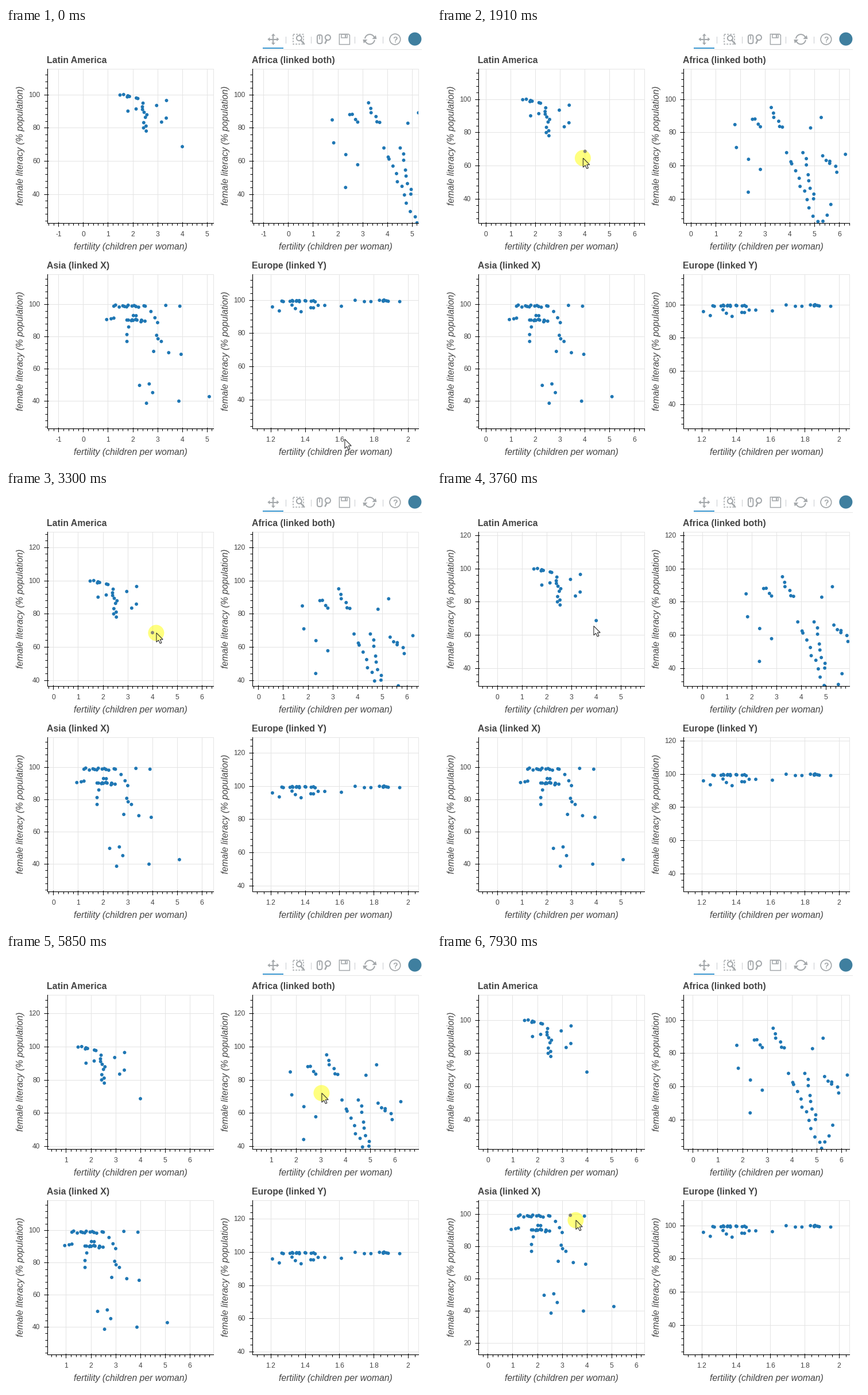
Animation, 740 px wide and 756 px high, one loop 8 s. Source, as a matplotlib script:

```python
import math

import matplotlib.pyplot as plt
import numpy as np
from matplotlib.animation import FuncAnimation
from matplotlib.collections import LineCollection
from matplotlib.patches import Circle, FancyBboxPatch, Polygon, Rectangle

WIDTH, HEIGHT, DPI = 740, 756, 100
PT = 72 / DPI  # points per pixel
LOOP_MS, INTERVAL = 8000, 40
STEPS_PER_MS = 13 / 1000  # the screen refreshes 13 times a second

BLUE, GRID, INK, ICON = "#1f77b4", "#e5e5e5", "#444444", "#a4a8ab"
COVERED = "#86867a"
PANEL_W, PANEL_H = 289, 268
HALO_RADIUS = 14

plt.rcParams["font.family"] = "Liberation Sans"
rng = np.random.default_rng(7)


def cloud(jitter, *strands):
    """Join strands of evenly spaced points whose inner points are jittered."""
    parts = []
    for count, start, end in strands:
        points = np.linspace(start, end, count)
        points[1:-1] += rng.uniform(-1, 1, points[1:-1].shape) * jitter
        parts.append(points)
    return np.vstack(parts)


# Strands run between (fertility, literacy) points.
LATIN = cloud(
    (0.1, 0.8),
    (7, (1.49, 99.7), (2.21, 97.6)), (2, (1.81, 90), (2.14, 91.3)),
    (10, (2.42, 94.8), (2.55, 78)), (2, (2.97, 93.4), (3.37, 96.4)),
    (2, (3.17, 83.4), (3.36, 85.8)), (1, (4.01, 68.6), (4.01, 68.6)))
AFRICA = cloud(
    (0.08, 2),
    (2, (1.78, 84.7), (1.84, 70.9)), (2, (2.33, 63.8), (2.32, 44)),
    (4, (2.49, 87.9), (2.81, 83.4)), (6, (3.25, 95), (3.70, 83.2)),
    (12, (3.87, 67.8), (5.21, 22.7)), (8, (4.53, 67.8), (4.96, 40)),
    (2, (4.84, 82.7), (5.27, 89)), (6, (5.33, 65.9), (5.90, 56)),
    (2, (2.81, 57.7), (6.25, 66.8)), (3, (5.66, 36.6), (5.34, 26.5)))
ASIA = cloud(
    (0.06, 0.8),
    (13, (1.24, 98.9), (2.51, 98.9)), (2, (3.34, 99.4), (3.91, 98.9)),
    (12, (1.77, 90.3), (2.50, 89.6)), (2, (2.03, 93.1), (2.14, 93)),
    (3, (0.95, 90.6), (1.24, 91.5)), (3, (2.74, 95.6), (3.01, 88.7)),
    (3, (1.84, 86), (1.77, 77)), (3, (2.97, 80.8), (3.16, 77)),
    (3, (2.85, 70.8), (3.96, 69)), (2, (2.28, 49.7), (2.67, 50.6)),
    (2, (2.81, 45.2), (2.56, 38.6)), (2, (3.87, 39.9), (5.10, 42.7)))
EUROPE = cloud(
    (0.02, 0.6),
    (14, (1.265, 99.3), (1.459, 98.9)), (2, (1.21, 95.8), (1.25, 93.4)),
    (3, (1.324, 96.9), (1.377, 92.9)), (4, (1.434, 95.3), (1.515, 96.7)),
    (2, (1.612, 96.2), (1.692, 99.8)), (2, (1.746, 99), (1.784, 99)),
    (7, (1.834, 99.8), (1.885, 99.2)), (1, (1.952, 99), (1.952, 99)))

# Corners of the pointer's path: refresh step and pixel.
POINTER = [
    (0, 589, 714), (4, 222, 205), (7, 300, 217), (15, 234, 223),
    (17, 234, 223), (31, 273, 228), (34, 288, 225), (37, 288, 225),
    (40, 222, 279), (43, 261, 246), (49, 272, 234), (55, 592, 193),
    (60, 604, 185), (65, 543, 181.5), (73, 543, 181.5), (77, 551, 261),
    (90, 588, 175), (94, 255, 490), (102, 241, 462)]
LINKED_DRAGS = [(7, 49), (55, 65), (69, 90)]
ASIA_DRAGS = [(94, 104)]


def pointer_at(step):
    steps, xs, ys = zip(*POINTER)
    return np.array([np.interp(step, steps, xs), np.interp(step, steps, ys)])


def dragged(step, drags):
    """Total pan so far; the plots trail the pointer by one refresh."""
    return sum(pointer_at(np.clip(step - 1, start, end)) - pointer_at(start)
               for start, end in drags)


fig = plt.figure(figsize=(WIDTH / DPI, HEIGHT / DPI), dpi=DPI, facecolor="white")
ax = fig.add_axes([0, 0, 1, 1])
# Whole numbers fall on pixel centres, nudged so that lines snap there.
ax.set_xlim(-0.4, WIDTH - 0.4)
ax.set_ylim(HEIGHT - 0.6, -0.6)
ax.axis("off")


def line(points, color=ICON, width=1.0, **kw):
    xs, ys = zip(*points)
    ax.plot(xs, ys, color=color, lw=width * PT, **kw)


def label(x, y, text, px, ha="center", **kw):
    return ax.text(x, y, text, fontsize=px * PT, ha=ha,
                   color=kw.pop("color", INK), **kw)


def shape(patch, filled=False, width=1.5, color=ICON):
    patch.set(facecolor=color if filled else "none", edgecolor=color,
              linewidth=0 if filled else width * PT)
    ax.add_patch(patch)


class Panel:
    """A scatter plot placed by the pixels of x = 0 and y = 100."""

    def __init__(self, title, left, top, data, x_scale, y_scale, x_step=1):
        self.left, self.top = left, top
        self.right, self.bottom = left + PANEL_W, top + PANEL_H
        self.data, self.x_scale, self.y_scale = data, x_scale, y_scale
        self.x_step = x_step
        mid_x, mid_y = left + PANEL_W / 2, top + PANEL_H / 2

        line([(left, top), (self.right, top), (self.right, self.bottom)], GRID)
        line([(left, top), (left, self.bottom), (self.right, self.bottom)],
             "black", 1.1, zorder=2.5)
        label(left - 1, top - 10, title, 15.9, "left", weight="bold")
        label(mid_x, self.bottom + 46, "fertility (children per woman)", 15.75,
              style="italic")
        label(left - 47, mid_y, "female literacy (% population)", 15.75,
              va="center", rotation=90, style="italic")

        self.grid = self.lines(GRID, 1)
        self.ticks = self.lines("black", 2.5)
        self.dots = ax.scatter(*data.T, s=(5.9 * PT) ** 2, lw=0, zorder=3.6)
        self.dots.set_clip_path(Rectangle(
            (left, top), PANEL_W, PANEL_H, transform=ax.transData))
        self.x_labels = [label(0, self.bottom + 23, "", 12) for _ in range(9)]
        self.y_labels = [label(left - 13, 0, "", 12, "right") for _ in range(8)]

    @staticmethod
    def lines(color, z):
        return ax.add_collection(
            LineCollection([], colors=color, linewidths=1.05 * PT, zorder=z))

    @staticmethod
    def find_ticks(zero, scale, step, low, high):
        """Yield (pixel, value, is_major) for five ticks per step."""
        unit = scale * step / 5
        first, last = sorted([(low - zero) / unit, (high - zero) / unit])
        for k in range(math.ceil(first), math.floor(last) + 1):
            yield zero + k * unit, k * step / 5, k % 5 == 0

    def update(self, x_zero, y_hundred, halo):
        y_zero = y_hundred + 100 * self.y_scale
        grid, ticks, x_text, y_text = [], [], [], []
        for x, value, major in self.find_ticks(
                x_zero, self.x_scale, self.x_step, self.left, self.right):
            inner, outer = (2, 6) if major else (0, 4)
            ticks.append([(x, self.bottom - inner), (x, self.bottom + outer)])
            if major:
                grid.append([(x, self.top), (x, self.bottom)])
                x_text.append((x, f"{value:g}"))
        for y, value, major in self.find_ticks(
                y_zero, -self.y_scale, 20, self.top, self.bottom):
            inner, outer = (2, 6) if major else (0, 4)
            ticks.append([(self.left - outer, y), (self.left + inner, y)])
            if major:
                grid.append([(self.left, y), (self.right, y)])
                y_text.append((y, f"{value:g}"))
        self.grid.set_segments(grid)
        self.ticks.set_segments(ticks)
        for i, item in enumerate(self.x_labels):
            x, text = x_text[i] if i < len(x_text) else (0, "")
            item.set(x=x, text=text)
        for i, item in enumerate(self.y_labels):
            y, text = y_text[i] if i < len(y_text) else (0, "")
            item.set(y=y + 4, text=text)

        spots = np.column_stack([x_zero + self.data[:, 0] * self.x_scale,
                                 y_zero - self.data[:, 1] * self.y_scale])
        self.dots.set_offsets(spots)
        covered = np.zeros(len(spots), bool)
        if halo is not None:
            covered = np.hypot(*(spots - halo).T) < HALO_RADIUS
        self.dots.set_facecolor([COVERED if c else BLUE for c in covered])


def magnifier(x, y, radius, handle):
    shape(Circle((x, y), radius), width=2)
    dx, dy = np.array(handle) / np.hypot(*handle) * radius
    line([(x + dx, y + dy), (x + handle[0], y + handle[1])], width=2.6)


def draw_toolbar():
    line([(447, 36.5), (723, 36.5)], GRID)
    ax.add_patch(Rectangle((447, 33), 36, 2.8, color="#3a96cf", lw=0))
    for x in (487, 531, 607, 656):
        line([(x, 14), (x, 25)], "#c8cccf")

    # pan
    for dx, dy in ((1, 0), (-1, 0), (0, 1), (0, -1)):
        line([(465, 19), (465 + 7 * dx, 19 + 7 * dy)], width=2)
        shape(Polygon([(465 + 10 * dx, 19 + 10 * dy),
                       (465 + 6 * dx + 3.5 * dy, 19 + 6 * dy + 3.5 * dx),
                       (465 + 6 * dx - 3.5 * dy, 19 + 6 * dy - 3.5 * dx)]), True)

    # box zoom and wheel zoom
    shape(Rectangle((500, 10), 18, 17, linestyle=(0, (2, 1.4))))
    magnifier(510, 17, 4.5, (8.5, 10))
    shape(FancyBboxPatch((545, 15), 1.5, 8, boxstyle="round,pad=3.5"), width=2)
    line([(545.7, 13), (545.7, 18)], width=1.6)
    magnifier(560, 16, 4.6, (-4.5, 9.5))

    # save
    shape(Polygon([(580, 10), (596, 10), (598, 12), (598, 28), (580, 28)]))
    shape(Rectangle((584, 10), 10, 6.5))
    line([(591, 12), (591, 15)], width=2)

    # reset
    for start in (195, 15):
        a = np.radians(np.linspace(start, start + 140, 24))
        line(zip(633 + 8.5 * np.cos(a), 19 + 8.5 * np.sin(a)), width=2)
    shape(Polygon([(637, 18.5), (645, 18.5), (643.5, 12)]), True)
    shape(Polygon([(629, 19.5), (621, 19.5), (622.5, 26)]), True)

    # help and badge
    shape(Circle((677, 19), 9.3), width=1.7)
    label(677, 24, "?", 14, color=ICON, weight="bold")
    shape(Circle((711.5, 18.5), 11.5), True, color="#3f7f9f")


ARROW = np.array([(0, 0), (0, 16), (3.7, 12.6), (6.4, 18.3), (9, 17.2),
                  (6.5, 11.5), (11.3, 11.5)]) + (0.5, 0)

draw_toolbar()
latin = Panel("Latin America", 72, 70, LATIN, 43.05, 2.885)
africa = Panel("Africa (linked both)", 429, 70, AFRICA, 43.05, 2.885)
asia = Panel("Asia (linked X)", 72, 427, ASIA, 43.05, 2.797)
europe = Panel("Europe (linked Y)", 429, 427, EUROPE, 298.7, 2.885, 0.2)

arrow_fill = ax.add_patch(Polygon(ARROW, facecolor="white", lw=0, zorder=3))
halo_disc = ax.add_patch(Circle((0, 0), HALO_RADIUS, facecolor=(1, 1, 0, 0.5),
                                lw=0, zorder=3.5))
arrow_edge = ax.add_patch(Polygon(ARROW, facecolor="none", edgecolor="#2a2a2a",
                                  lw=1.1 * PT, zorder=5))


def draw(frame):
    step = int((frame * INTERVAL + 30) * STEPS_PER_MS)
    pointer = pointer_at(step)
    pressed = any(start < step < end for start, end in LINKED_DRAGS + ASIA_DRAGS)
    halo = pointer if pressed else None

    linked_pan, asia_pan = dragged(step, LINKED_DRAGS), dragged(step, ASIA_DRAGS)
    x = 134 + linked_pan[0] + asia_pan[0]
    y = 115 + linked_pan[1]
    latin.update(x, y, halo)
    africa.update(x + 357, y, halo)
    asia.update(x, 479.8 + asia_pan[1], halo)
    europe.update(102.1, y + 357, halo)

    halo_disc.set(center=pointer, visible=pressed)
    for arrow in (arrow_fill, arrow_edge):
        arrow.set_xy(ARROW + pointer)
    return []


anim = FuncAnimation(fig, draw, frames=LOOP_MS // INTERVAL, interval=INTERVAL,
                     repeat=True, blit=False)
plt.show()
```
